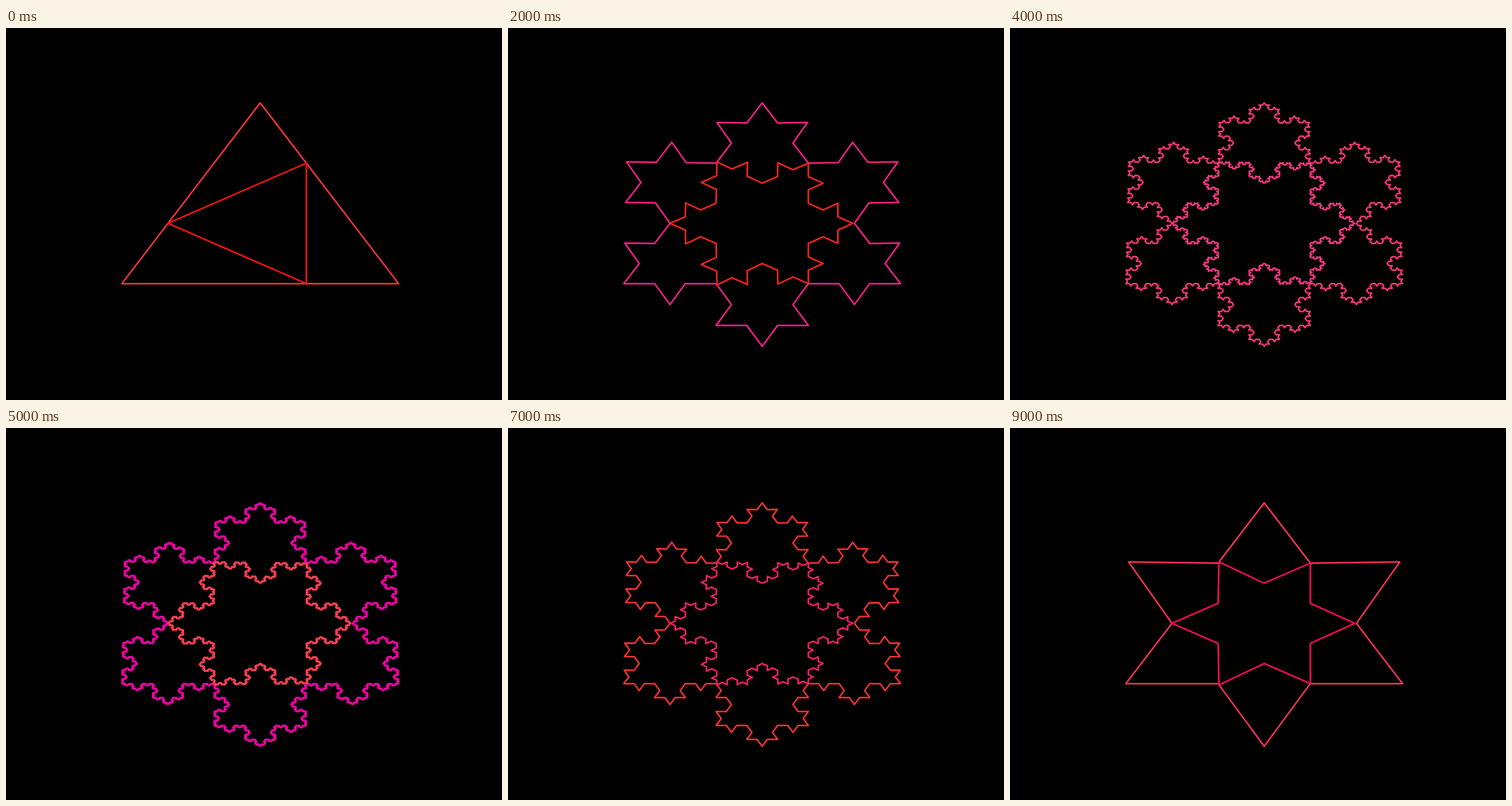
Recreate the animation shown at these times as an HTML page with a canvas. Size 864x648 px, loop 10000 ms.

```html
<!DOCTYPE html>
<html lang="en">
<head>
<meta charset="utf-8">
<title>Nested snowflakes</title>
<style>
  html, body { margin: 0; width: 100%; height: 100%; overflow: hidden; background: #000; }
  canvas { display: block; }
</style>
</head>
<body>
<canvas id="stage" width="864" height="648"></canvas>
<script>
const ctx = document.getElementById('stage').getContext('2d');
const STEP = 1000;
const Y_SCALE = 0.785; // the plane is flattened vertically after the curve is built
const BUMP = Math.sqrt(3) / 2;

const top_ = [442.8, 130.4], right = [683.8, 445.3], left = [201.8, 445.3];
const lerp = (a, b, t) => [a[0] + (b[0] - a[0]) * t, a[1] + (b[1] - a[1]) * t];
const outer = [top_, right, left];
const inner = [lerp(top_, right, 1 / 3), lerp(left, right, 2 / 3), lerp(left, top_, 1 / 3)];

// depth, outer colour, inner colour
const steps = [
  [0, '#ff333d', '#ff140f'],
  [1, '#ff2a5c', '#ff1f3c'],
  [2, '#ff1f8b', '#ff2619'],
  [3, '#ff2a66', '#ff2a48'],
  [4, '#ff3874', '#ff3885'],
  [5, '#ff00aa', '#ff4053'],
  [5, '#ff0040', '#ff4062'],
  [3, '#ff3330', '#ff1f6b'],
  [2, '#ff2a5c', '#ff2a48'],
  [1, '#ff3355', '#ff0a5c']
];

// Replace every side of a clockwise polygon with four shorter ones.
function grow(points) {
  return points.flatMap((a, i) => {
    const b = points[(i + 1) % points.length];
    const p = lerp(a, b, 1 / 3), q = lerp(a, b, 2 / 3), mid = lerp(a, b, 1 / 2);
    const dx = q[0] - p[0], dy = (q[1] - p[1]) / Y_SCALE;
    const tip = [mid[0] + dy * BUMP, mid[1] - dx * BUMP * Y_SCALE];
    return [a, p, tip, q];
  });
}

function flake(triangle, depth) {
  let points = triangle;
  while (depth-- > 0) points = grow(points);
  const path = new Path2D();
  points.forEach(p => path.lineTo(p[0], p[1]));
  path.closePath();
  return path;
}

const scenes = steps.map(([depth, outerColor, innerColor]) => [
  [flake(outer, depth), outerColor],
  [flake(inner, depth), innerColor]
]);

function draw(index) {
  ctx.fillStyle = '#000';
  ctx.fillRect(0, 0, 864, 648);
  ctx.lineWidth = 2.7;
  ctx.lineJoin = 'round';
  for (const [path, color] of scenes[index]) {
    ctx.strokeStyle = color;
    ctx.stroke(path);
  }
}

const start = performance.now();
let shown = -1;
function tick() {
  const index = Math.floor((performance.now() - start) / STEP) % steps.length;
  if (index !== shown) draw(shown = index);
  requestAnimationFrame(tick);
}
tick();
</script>
</body>
</html>
```
